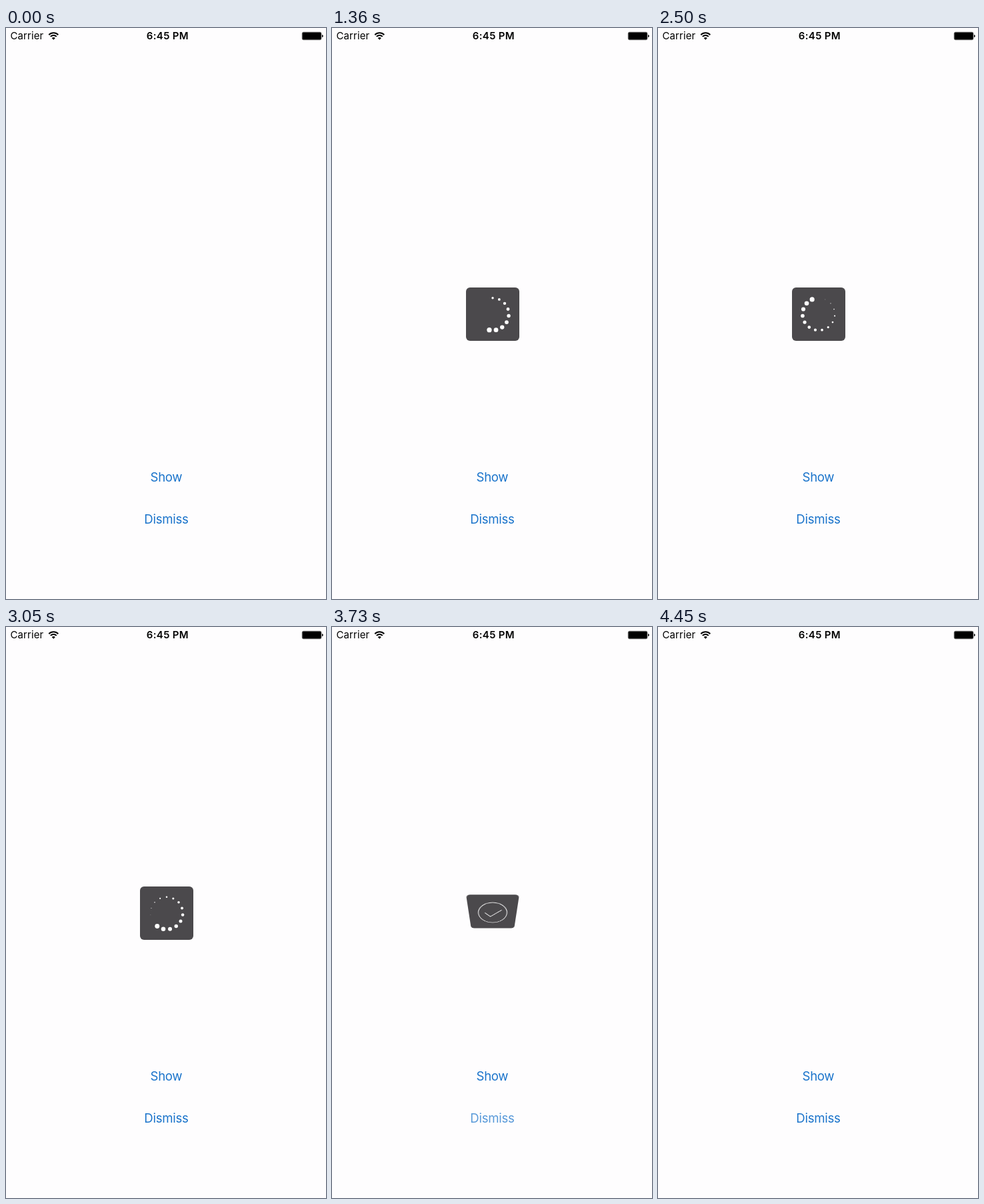
Write an HTML page that moves like this. It is 480x856 px and loops after 4.63 s.

```html
<!DOCTYPE html>
<html lang="en">
<head>
<meta charset="utf-8">
<title>Loading indicator</title>
<style>
  html, body { margin: 0; width: 100%; height: 100%; overflow: hidden; background: #fefdfe; }
  #hud { position: absolute; left: 200.5px; top: 388.8px; width: 80px; height: 80px; border-radius: 6px; background: #4b494c; }
  svg { position: absolute; left: 0; top: 0; }
  text { font-family: Inter, sans-serif; font-size: 15px; }
  .button { font-size: 18.6px; letter-spacing: -.3px; fill: #1b74cb; text-anchor: middle; }
</style>
</head>
<body>
<div id="hud">
  <svg width="80" height="80" viewBox="-40 -40 80 80">
    <g id="dots" fill="#fff"></g>
    <g id="done" fill="none" stroke="#fff" stroke-width="1.1">
      <circle r="24"/>
      <path d="M-13-1L-4 8.5L15-7.5"/>
    </g>
  </svg>
</div>
<svg width="480" height="856">
  <text x="6.5" y="17.4" letter-spacing=".1">Carrier</text>
  <g fill="none" stroke="#000" stroke-width="2">
    <path d="M64.3 10.2a10 10 0 0 1 14 0M66.8 12.9a6.4 6.4 0 0 1 9 0"/>
  </g>
  <path d="M71.3 17.8L68.7 15.1a3.8 3.8 0 0 1 5.2 0z"/>
  <text x="242.4" y="17.4" text-anchor="middle" font-weight="600" letter-spacing=".35">6:45 PM</text>
  <rect x="444.2" y="6.2" width="28.8" height="11.6" rx="2" stroke="#777" stroke-width=".8"/>
  <path d="M474 10v4.2q1.8-.6 1.8-2.1t-1.8-2.1z"/>
  <text id="show" class="button" x="240.4" y="680">Show</text>
  <text id="dismiss" class="button" x="240.4" y="743">Dismiss</text>
</svg>
<script>
const LOOP = 4630, COUNT = 15, STEP = 800 / COUNT, TRAVEL = 469;
const DROP = 490, SPIN = 925, FLIP = 3530, LEAVE = 4228;
const $ = id => document.getElementById(id);
const progress = (t, start, length) => Math.min(1, Math.max(0, (t - start) / length));

const dots = Array.from({ length: COUNT }, (_, i) => {
  const dot = document.createElementNS('http://www.w3.org/2000/svg', 'circle');
  const angle = i / COUNT * 2 * Math.PI;
  dot.setAttribute('cx', 24.2 * Math.sin(angle));
  dot.setAttribute('cy', -24.2 * Math.cos(angle));
  return $('dots').appendChild(dot);
});

// Vertical offset of the panel: springs in from above, accelerates out again.
function offset(t) {
  if (t < DROP) return -TRAVEL;
  const s = (t - DROP) / 1000, decay = 20, freq = 26.8;
  const spring = Math.exp(-decay * s) * (Math.cos(freq * s) + decay / freq * Math.sin(freq * s));
  return -TRAVEL * (t < 1000 ? spring : progress(t, LEAVE, 200) ** 1.67);
}

// A tapped button dims at once and fades back.
function buttonOpacity(t, tap) {
  return t < tap ? 1 : 1 - .8 * (1 - progress(t, tap, 450)) ** 2;
}

function draw(t) {
  const p = progress(t, FLIP, 300), angle = 180 * p * p * (3 - 2 * p);
  const flipped = angle > 90;
  let transform = `translateY(${offset(t)}px)`;
  if (p > 0 && p < 1) {
    const depth = -40 * Math.sin(angle * Math.PI / 180);
    transform = `perspective(240px) translateZ(${depth}px) rotateX(${flipped ? angle - 180 : angle}deg)`;
  }
  $('hud').style.transform = transform;
  $('dots').style.display = flipped ? 'none' : '';
  $('done').style.display = flipped ? '' : 'none';

  const lead = (t - SPIN) / STEP;
  dots.forEach((dot, i) => {
    const age = (lead - i) % COUNT;
    dot.setAttribute('r', lead < i ? 0 : 3.7 * (1 - age / COUNT));
  });
  $('show').style.opacity = buttonOpacity(t, 500);
  $('dismiss').style.opacity = buttonOpacity(t, 3545);
}

const start = performance.now();
function tick() {
  draw((performance.now() - start) % LOOP);
  requestAnimationFrame(tick);
}
tick();
</script>
</body>
</html>
```
